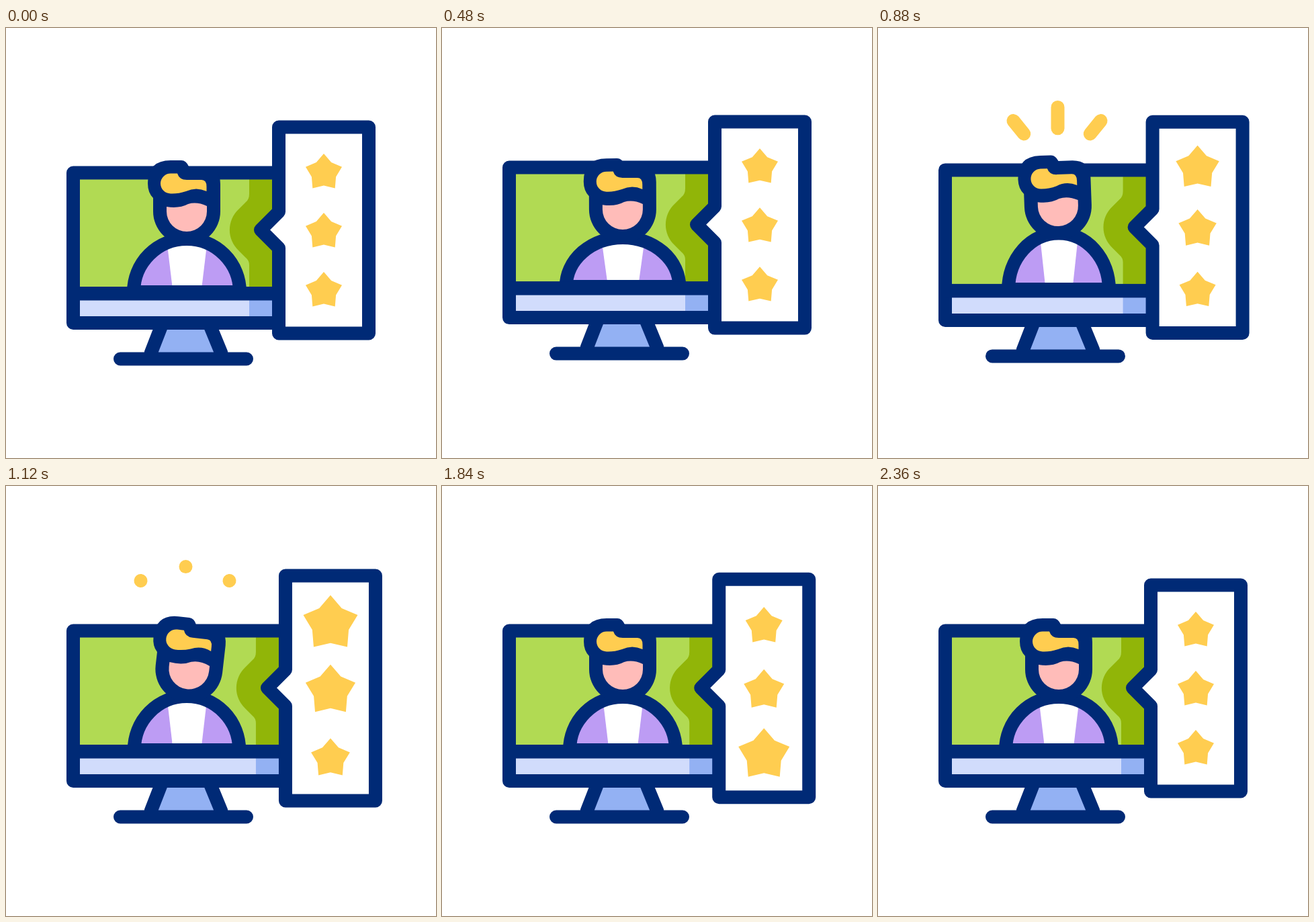
These frames come from a looping animation (640x640 px, 2440 ms). An HTML page with a canvas:

```html
<!DOCTYPE html>
<html lang="en">
<head>
<meta charset="utf-8">
<title>Online review</title>
<style>
html, body { margin: 0; width: 100%; height: 100%; overflow: hidden; background: #fff; }
canvas { display: block; width: 640px; height: 640px; }
</style>
</head>
<body>
<canvas id="stage" width="640" height="640"></canvas>
<script>
const ctx = document.getElementById('stage').getContext('2d');
const LOOP = 2440;
const NAVY = '#002a76', GREEN = '#b1da53', OLIVE = '#91b508', PALE = '#d1dcfc',
      BLUE = '#93b1f3', PURPLE = '#bd9cf4', YELLOW = '#ffcd50', PINK = '#ffbcb9';

const ease = p => (1 - Math.cos(Math.PI * Math.min(1, Math.max(0, p)))) / 2;
const ramp = (t, start, end) => ease((t - start) / (end - start));
const pulse = (t, a, b, c, d) => ramp(t, a, b) - ramp(t, c, d);

// Eased value through time/value pairs.
function track(t, ...keys) {
  let value = keys[0][1];
  for (let i = 1; i < keys.length; i++)
    value += (keys[i][1] - keys[i - 1][1]) * ramp(t, keys[i - 1][0], keys[i][0]);
  return value;
}

function fill(path, color) {
  ctx.fillStyle = color;
  ctx.fill(new Path2D(path));
}

function stroke(path, color = NAVY) {
  ctx.strokeStyle = color;
  ctx.stroke(new Path2D(path));
}

function rect(x, y, right, bottom, color) {
  ctx.fillStyle = color;
  ctx.fillRect(x, y, right - x, bottom - y);
}

function group(draw) {
  ctx.save();
  draw();
  ctx.restore();
}

function drawRays(t) {
  if (t < 600 || t >= 1140) return;
  const tip = ramp(t, 600, 920), tail = ramp(t, 700, 1120);
  for (const [x0, y0, x1, y1] of [[228, 175, 200.5, 141], [267.5, 175, 267.5, 120], [305, 175, 332.5, 141]]) {
    const at = p => `${x0 + (x1 - x0) * p} ${y0 + (y1 - y0) * p}`;
    stroke(`M${at(Math.min(tail, tip - 0.001))}L${at(tip)}`, YELLOW);
  }
}

function drawStand() {
  fill('M233 439L215.5 484H320.5L302 439Z', BLUE);
  stroke('M233 439L215.5 484M302 439L320.5 484M170 492.5H358');
}

function drawScreen(dx) {
  rect(100, 215, 480, 395, GREEN);
  rect(100, 395, 480, 439, PALE);
  group(() => {
    ctx.translate(dx, 0);
    fill('M362 220V247Q362 255 357 259L346 270A42 42 0 0 0 346 331L357 342Q362 346 362 353V390H450V220Z', OLIVE);
    rect(362, 400, 450, 435, BLUE);
  });
  stroke('M100 215.5H480V439H100Z');
}

function drawPerson(squash, tilt) {
  group(() => {
    const body = new Path2D(), shirt = new Path2D();
    const fit = new DOMMatrix().translate(269, 393).scale(1 + squash * 0.0115, 1 - squash * 0.0127);
    body.addPath(new Path2D('M-79 0A79 79 0 0 1 79 0Z'), fit);
    shirt.addPath(new Path2D('M-30 -79L-21 -4H22L31 -79Z'), fit);
    ctx.fillStyle = PURPLE;
    ctx.fill(body);
    ctx.fillStyle = '#fff';
    ctx.fill(shirt);
    ctx.strokeStyle = NAVY;
    ctx.stroke(body);
  });
  rect(100, 385, 480, 405.5, NAVY);
  group(() => {
    ctx.translate(269, 303 + squash * 0.85);
    ctx.rotate(tilt * Math.PI / 180);
    ctx.translate(-269, -303);
    fill('M219 273V253Q211 245 211 231Q211 197 245 197H261Q268 197 272 206H293Q319 207 319 232V273A50 50 0 0 1 219 273Z', NAVY);
    fill('M239 266Q258 269 271 262Q284 258 299 265V273A30 30 0 0 1 239 273Z', PINK);
    fill('M245 216.5H255Q258 226 269 226H291Q298.500 226 298.500 236V243Q283 236 268 243Q256 247 245 246.500A15 15 0 0 1 245 216.500Z', YELLOW);
  });
}

function drawStar(x, y, radius) {
  ctx.beginPath();
  for (let i = 0; i < 10; i++) {
    const r = i % 2 ? radius * 0.67 : radius, a = i * Math.PI / 5;
    ctx.lineTo(x + r * Math.sin(a), y - r * Math.cos(a));
  }
  ctx.fillStyle = YELLOW;
  ctx.fill();
}

function drawCard(t, open) {
  const grow = 17.5 * open;
  const outline = `M406 ${147.5 - grow}H540V${454.5 + grow}H406V327.500L379 300.500L406 273.500Z`;
  fill(outline, '#fff');
  stroke(outline);
  const stars = [[215.5, -13, 660, 1410], [303.5, 1.5, 780, 1500], [391.5, 18, 995, 1690]];
  for (const [y, shift, up, down] of stars)
    drawStar(473, y + shift * open, 28.4 * (1 + 0.52 * pulse(t, up, up + 530, down, down + 490)));
}

function draw(t) {
  const hop = -12 * pulse(t, 240, 640, 640, 1040);
  const open = pulse(t, 700, 1300, 1540, 2140);
  const squash = track(t, [240, 0], [460, 6], [660, 0], [880, -4.5], [1220, 0]);
  const tilt = track(t, [440, 0], [760, -5], [1120, 6.5], [1440, 0]);

  ctx.clearRect(0, 0, 640, 640);
  ctx.lineWidth = 20;
  ctx.lineCap = ctx.lineJoin = 'round';
  group(() => {
    ctx.translate(0, hop);
    drawRays(t);
    drawStand();
    drawScreen(12.5 * open);
    drawPerson(squash, tilt);
    ctx.translate(12.5 * open, 0);
    drawCard(t, open);
  });
}

function tick() {
  draw(performance.now() % LOOP);
  requestAnimationFrame(tick);
}
tick();
</script>
</body>
</html>
```
